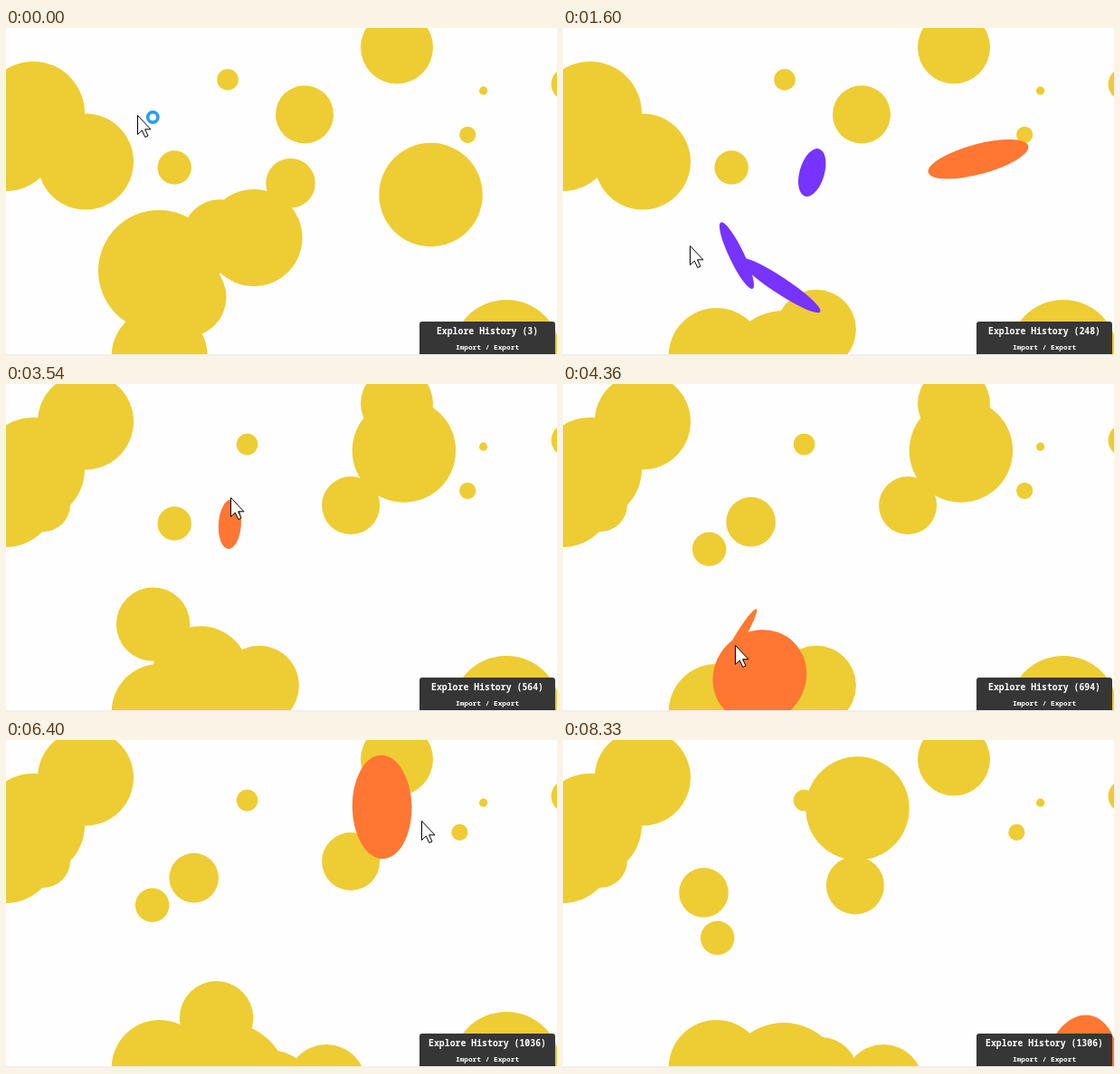
Animation of 609 by 362 pixels, one loop 8.43 s. Source, as an HTML page with a canvas:

```html
<!DOCTYPE html>
<html lang="en">
<head>
<meta charset="utf-8">
<title>Flipping dots</title>
<style>
  html, body { margin: 0; width: 100%; height: 100%; overflow: hidden; background: #fefefe; }
  #stage { position: relative; width: 609px; height: 362px; overflow: hidden; }
  canvas, svg { position: absolute; left: 0; top: 0; display: block; }
  text { font-family: "Noto Sans Mono", "DejaVu Sans Mono", monospace; font-weight: 700; fill: #fff; text-anchor: middle; }
</style>
</head>
<body>
<div id="stage">
  <canvas id="dots" width="609" height="362"></canvas>
  <svg width="609" height="362">
    <rect y="360" width="609" height="2" fill="#efefef"/>
    <path d="M457 360V327q0-3 3-3H604q3 0 3 3V360z" fill="#363636"/>
    <text id="count" x="532" y="338" font-size="9.85"></text>
    <text x="532" y="355" font-size="7.8">Import / Export</text>
    <circle id="busy" cx="162.3" cy="98.5" r="5.6" fill="#fff" stroke="#2b9df0" stroke-width="3.6"/>
    <path id="arrow" d="M-.5 .5V21.5L4.3 17L7.8 24.5L11 23L7.6 15.8H14z" fill="#fff" stroke="#000"/>
  </svg>
</div>
<script>
const LOOP = 8430, FLIP = 400, TICK = 135;
const YELLOW = '#eecc33', ORANGE = '#ff7733', PURPLE = '#7733ff';

// A dot turns over like a coin, so every flip carries it one diameter along its angle.
// x, y, radius, then flips as [start ms, degrees]
const dots = [
  [0, 124, 56],
  [41, 133, 30],
  [30, 94, 57, [2548, -104], [2960, 76]],
  [88, 147.5, 53, [2120, -90]],
  [245, 57, 11.8, [2448, 24]],
  [186.2, 154, 18.7, [3800, 131], [6910, 76]],
  [330, 95.5, 32, [2810, 37], [6400, 155.5]],
  [432, 21.5, 40],
  [527.6, 69.2, 4.6],
  [510.2, 117.8, 9.1, [5540, -119]],
  [469.5, 184, 57.2, [1458, -105], [6300, 179]],
  [314.5, 171.2, 27.3, [1300, 196.5], [3430, 183.7], [6694, 162.7]],
  [199.5, 297, 44, [960, 24], [4740, 32.5]],
  [169, 268, 67, [820, 56]],
  [169.7, 362, 53],
  [236, 230, 40.7, [1360, 154.4], [4186, 30.7], [7850, 49.7]],
  [274, 231.5, 53.5, [1366, 123.4], [4348, 44.5]],
  [553, 360, 60, [8264, 9]],
  [621, 62, 18.4]
];

const history = [[0, 3], [1600, 248], [2580, 413], [4360, 694], [5740, 924], [7030, 1147], [8330, 1306], [LOOP, 1306]];

const pointer = [
  [0, 146, 96], [820, 125, 214], [1240, 175, 225], [1600, 141, 240], [2120, 40, 195],
  [2448, 235, 52], [2580, 251, 52], [3100, 330, 100], [3800, 200, 140], [4360, 191, 288],
  [5500, 600, 260], [5740, 500, 85], [6300, 500, 76], [7030, 153, 191], [7720, 155, 215],
  [8262, 500, 350], [8330, 620, 370], [LOOP, 620, 370]
];

// The two keys around t and the fraction between them
function span(keys, t) {
  const i = keys.findIndex(k => k[0] > t), a = keys[i - 1], b = keys[i];
  return { a, b, p: (t - a[0]) / (b[0] - a[0]) };
}

function sample(keys, t) {
  const { a, b, p } = span(keys, t);
  return a.slice(1).map((v, j) => Math.round(v + (b[j + 1] - v) * p));
}

function snap(t) {
  const { a, b, p } = span(history, t);
  const length = b[0] - a[0], steps = Math.max(1, Math.round(length / TICK));
  return a[0] + Math.floor(p * steps) / steps * length;
}

function pose([x, y, r, ...flips], t) {
  let squash = 1, angle = 0, color = YELLOW;
  for (const [start, degrees] of flips) {
    const p = Math.min(1, Math.max(0, (t - start) / FLIP));
    const turn = degrees * Math.PI / 180;
    x += 2 * r * p * Math.cos(turn);
    y += 2 * r * p * Math.sin(turn);
    if (p > 0 && p < 1) {
      squash = Math.abs(1 - 2 * p);
      angle = turn;
      color = p < 0.5 ? ORANGE : PURPLE;
    }
  }
  return { x, y, r, squash, angle, color };
}

const get = id => document.getElementById(id);
const ctx = get('dots').getContext('2d');

function drawDot(d) {
  ctx.fillStyle = d.color;
  ctx.beginPath();
  ctx.ellipse(d.x, d.y, d.r * d.squash, d.r, d.angle, 0, Math.PI * 2);
  ctx.fill();
}

function render(t) {
  ctx.clearRect(0, 0, 609, 362);
  const poses = dots.map(d => pose(d, t));
  poses.filter(d => d.color === YELLOW).forEach(drawDot);
  poses.filter(d => d.color !== YELLOW).forEach(drawDot);

  get('arrow').setAttribute('transform', `translate(${sample(pointer, t)})`);
  get('busy').style.display = t < TICK / 2 ? '' : 'none';
  get('count').textContent = `Explore History (${sample(history, t)})`;
}

const origin = performance.now();
let shown;
function loop() {
  const t = snap((performance.now() - origin) % LOOP);
  if (t !== shown) render(shown = t);
  requestAnimationFrame(loop);
}
loop();
</script>
</body>
</html>
```
